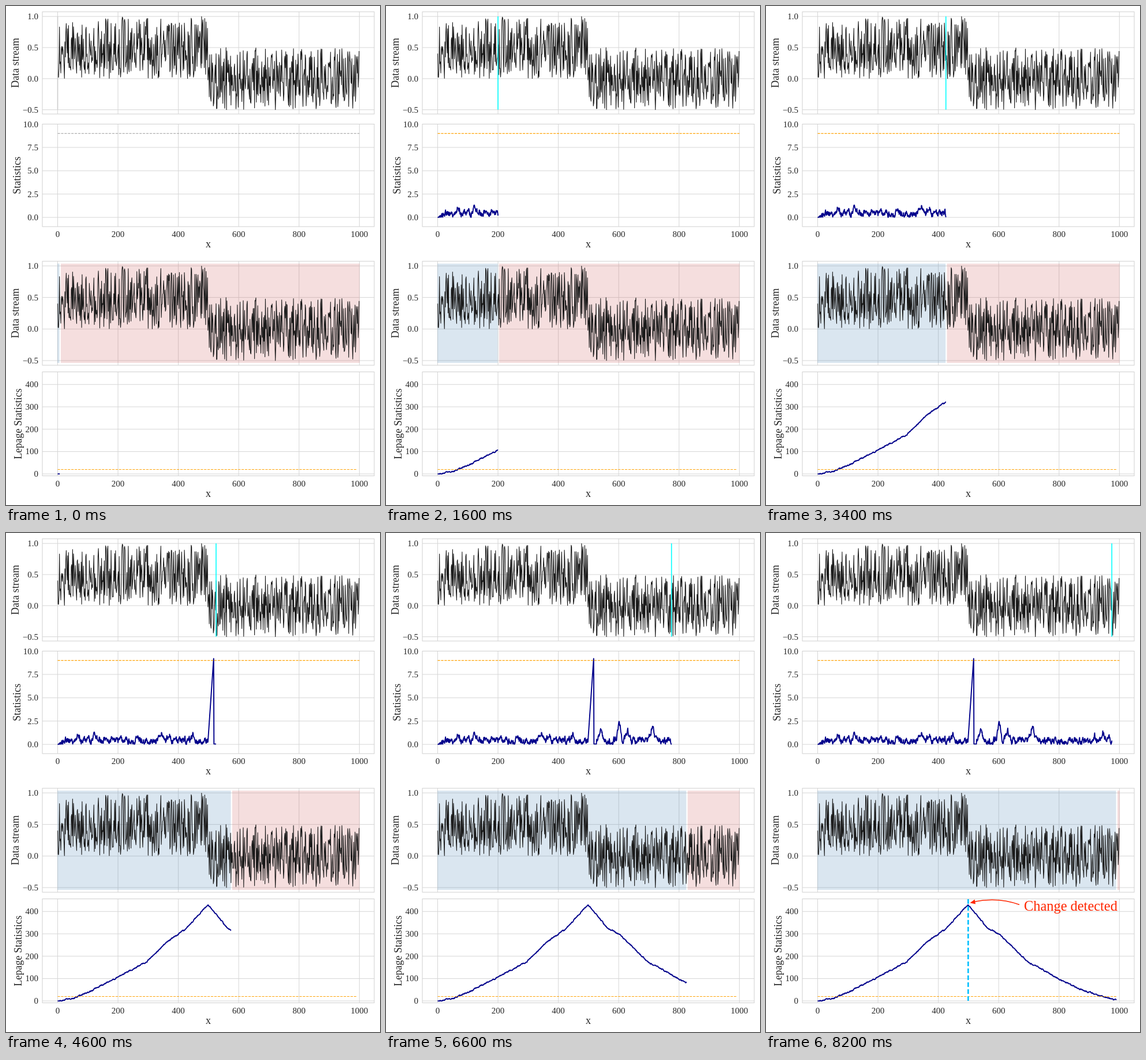
An HTML page that plays this animation: 648 by 864 pixels, repeating every 9.4 s.

```html
<!DOCTYPE html>
<html lang="en">
<head>
<meta charset="utf-8">
<title>Change detection</title>
<style>
  html, body { margin: 0; width: 100%; height: 100%; overflow: hidden; background: #fff; }
  svg { display: block; width: 648px; height: 864px; font-family: "Liberation Serif", serif; }
  text { fill: #262626; }
  .tick { font-size: 15px; }
  .label { font-size: 18px; text-anchor: middle; }
  .grid { stroke: #d6d6d6; stroke-width: 1; }
  .spine { fill: none; stroke: #d0d0d0; stroke-width: 1; }
  .stream { fill: none; stroke: #1a1a1a; stroke-width: 1.1; stroke-linejoin: round; }
  .stat { fill: none; stroke: #00008b; stroke-width: 1.9; stroke-linejoin: round; }
  .limit { stroke: #ffa500; stroke-width: 1.1; stroke-dasharray: 4.1 1.8; }
  .cursor { stroke: #0ff; stroke-width: 1.6; }
  .note { fill: #ff2600; font-size: 24.4px; }
</style>
</head>
<body>
<svg id="stage" viewBox="0 0 648 864"></svg>
<script>
const STEP = 200, LOOP = 9400, LAST = 41;
const CHANGE = 498, ALARM = 517;
const stage = document.getElementById("stage");
const px = x => 89.5 + x * 0.5228;

function set(el, attrs) {
  for (const key in attrs) el.setAttribute(key, attrs[key]);
}

function add(tag, attrs, text) {
  const el = document.createElementNS("http://www.w3.org/2000/svg", tag);
  set(el, attrs);
  if (text) el.textContent = text;
  return stage.appendChild(el);
}

function line(x1, y1, x2, y2, cls) {
  return add("line", { x1, y1, x2, y2, class: cls });
}

function random(seed) {
  return () => {
    seed = (seed + 0x6D2B79F5) | 0;
    let v = Math.imul(seed ^ (seed >>> 15), 1 | seed);
    v = (v + Math.imul(v ^ (v >>> 7), 61 | v)) ^ v;
    return ((v ^ (v >>> 14)) >>> 0) / 4294967296;
  };
}

// Noise that remembers a share of its previous value.
function drift(next, memory, size) {
  let value = 0;
  return () => value = value * memory + (next() - 0.5) * size;
}

function through(keys) {
  return x => {
    const k = Math.max(1, keys.findIndex(([kx]) => kx >= x));
    const [x0, y0] = keys[k - 1], [x1, y1] = keys[k];
    return y0 + (y1 - y0) * (x - x0) / (x1 - x0);
  };
}

function axes({ top, bottom, y, ticks, digits, label, labelX, xTicks }) {
  for (let x = 0; x <= 1000; x += 200) {
    line(px(x), top, px(x), bottom, "grid");
    if (xTicks) add("text", { x: px(x), y: bottom + 18, class: "tick", "text-anchor": "middle" }, String(x));
  }
  for (const v of ticks) {
    line(63, y(v), 638, y(v), "grid");
    add("text", { x: 56, y: y(v) + 5, class: "tick", "text-anchor": "end" },
      v.toFixed(digits).replace("-", "−"));
  }
  add("rect", { x: 63, y: top, width: 575, height: bottom - top, class: "spine" });
  add("text", { transform: `translate(${labelX} ${(top + bottom) / 2}) rotate(-90)`, class: "label" }, label);
  if (xTicks) add("text", { x: 350.5, y: bottom + 36, class: "label" }, "x");
}

const sample = (count, at, gap = 1) =>
  Array.from({ length: count }, (_, i) => [i * gap, at(i * gap)]);
const points = (data, y, end = 1000) =>
  data.filter(([x]) => x <= end).map(([x, v]) => `${px(x).toFixed(2)},${y(v).toFixed(2)}`).join(" ");

const yStreamA = v => 125.8 - v * 107.7;
const yStatA = v => 366 - v * 16.15;
const yStreamB = v => 559.3 - v * 109.3;
const yStatB = v => 810.2 - v * 0.3873;

const noise = random(27);
const stream = sample(667, x => noise() - (x < CHANGE ? 0 : 0.5), 1.5);

// Bumps of the upper statistic: centre, height.
const bumps = [[68, .8], [123, .9], [345, .7], [368, .6], [448, .5],
  [540, 1.3], [602, 1.9], [630, 1.1], [710, 1.5], [917, .6], [945, 1]];
const jitter = drift(noise, 0.65, 0.6);
const statA = sample(976, x => {
  const wobble = jitter();
  if (x > ALARM && x < 527) return 0.04;
  if (x >= CHANGE && x <= ALARM) return 0.25 + 8.95 * (x - CHANGE) / (ALARM - CHANGE);
  const bump = bumps.reduce((sum, [c, h]) => sum + h * Math.exp(-(((x - c) / 7) ** 2)), 0);
  return Math.abs(0.38 + bump + wobble) * Math.min(1, x / 8);
});

const trend = through([[0, 0], [50, 12], [100, 37], [215, 117], [295, 175], [360, 262], [425, 322],
  [CHANGE, 431], [560, 330], [605, 294], [700, 172], [825, 80], [900, 38], [990, 4]]);
const ripple = drift(noise, 0.75, 4);
const statB = sample(991, x => x < 8 ? 0 : Math.max(0, trend(x) + ripple()));

const streamAxes = { ticks: [1, .5, 0, -.5], digits: 1, label: "Data stream", labelX: 22 };
axes({ ...streamAxes, top: 10, bottom: 187, y: yStreamA });
axes({ top: 204.5, bottom: 382, y: yStatA, ticks: [10, 7.5, 5, 2.5, 0], digits: 1,
  label: "Statistics", labelX: 24.5, xTicks: true });
axes({ ...streamAxes, top: 442, bottom: 622, y: yStreamB });
axes({ top: 633.5, bottom: 813.5, y: yStatB, ticks: [400, 300, 200, 100, 0], digits: 0,
  label: "Lepage Statistics", labelX: 26.5, xTicks: true });

const band = fill => add("rect", { y: 446, height: 172, fill, "fill-opacity": .2 });
const seen = band("#4682b4"), ahead = band("#cd5c5c");
add("polyline", { points: points(stream, yStreamA), class: "stream" });
add("polyline", { points: points(stream, yStreamB), class: "stream" });
const cursor = line(0, 18, 0, 179.5, "cursor");
const curveA = add("polyline", { class: "stat" });
const curveB = add("polyline", { class: "stat" });
const limitA = line(px(0), yStatA(9), px(1000), yStatA(9), "limit");
line(px(0), yStatB(20), px(990), yStatB(20), "limit");

const finding = [
  add("line", { x1: 350.3, y1: 634, x2: 350.3, y2: 813.5, stroke: "#00bfff", "stroke-width": 2.6, "stroke-dasharray": "8 4" }),
  add("path", { d: "M439 643.5Q402 630 360 638.5", fill: "none", stroke: "#ff2600", "stroke-width": 1.6 }),
  add("path", { d: "M353.5 640.5L361.5 634.5L363 642.5Z", fill: "#ff2600" }),
  add("text", { x: 447, y: 654, class: "note" }, "Change detected")
];

function show(step) {
  // The upper detector restarts for two steps after its alarm.
  const a = 25 * (step <= 21 ? step : Math.max(21, step - 2));
  const b = Math.min(990, Math.max(7, 25 * step));
  const edge = px(b), start = edge + 1.8;
  set(seen, { x: 89, width: edge - 89.5 });
  set(ahead, { x: start, width: 612.8 - start });
  set(cursor, { x1: px(a), x2: px(a) });
  cursor.style.stroke = step ? "" : "#ccc";
  limitA.style.stroke = step ? "" : "#b0b0b0";
  set(curveA, { points: step ? points(statA, yStatA, a) : "" });
  set(curveB, { points: points(statB, yStatB, b) });
  for (const el of finding) el.style.display = step === LAST ? "" : "none";
}

let shown = -1;
const origin = performance.now();
function tick() {
  const step = Math.min(LAST, Math.floor(((performance.now() - origin) % LOOP) / STEP));
  if (step !== shown) show(shown = step);
  requestAnimationFrame(tick);
}
tick();
</script>
</body>
</html>
```
